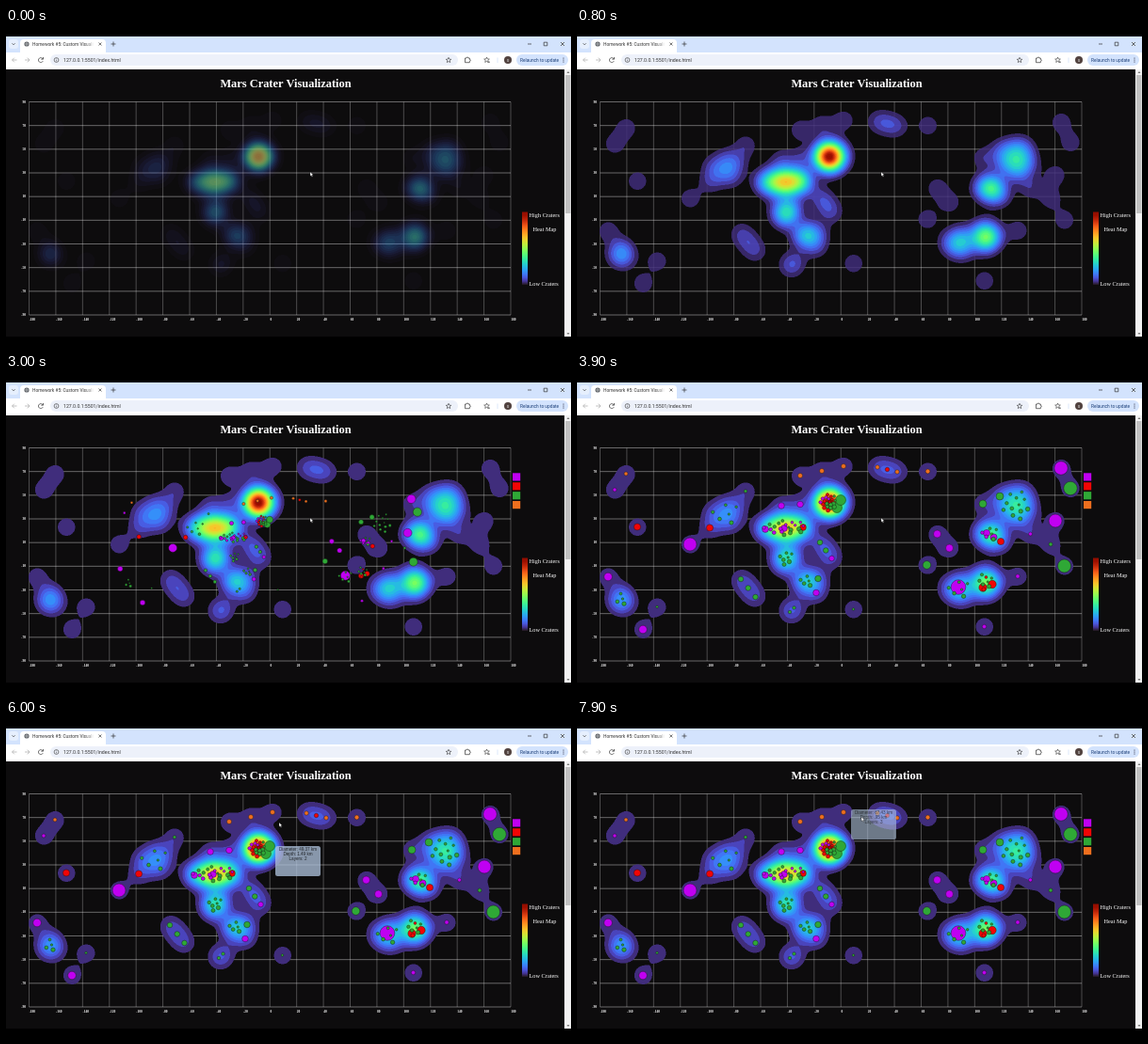
Animation, 600 px wide and 338 px high, one loop 8 s. Source, as an HTML page with a canvas:

```html
<!DOCTYPE html>
<html lang="en">
<head>
<meta charset="utf-8">
<title>Mars Crater Visualization</title>
<style>
  html, body { margin: 0; width: 100%; height: 100%; overflow: hidden; background: #000; }
  canvas { display: block; }
</style>
</head>
<body>
<canvas id="stage" width="600" height="338"></canvas>
<script>
const LOOP = 8000;
const UI = 'Roboto, "Open Sans", sans-serif';
const SERIF = '"Liberation Serif", serif';
const SANS = '"Liberation Sans", sans-serif';
const COLORS = { p: '#c000f2', r: '#f20505', g: '#2fa836', o: '#ee6f1e' };
const PLOT = { x: 24.5, y: 78.5, right: 536, bottom: 305 };
const CENTER = { x: 280, y: 192 };

const ctx = document.getElementById('stage').getContext('2d');
const clamp = (v, lo = 0, hi = 1) => Math.max(lo, Math.min(hi, v));
const mix = (a, b, k) => a + (b - a) * k;
const cubicInOut = t => t < .5 ? 4 * t ** 3 : 1 - 4 * (1 - t) ** 3;
const progress = (t, start, length) => cubicInOut(clamp((t - start) / length));

// ---------- craters: each letter of `kinds` is a colour ----------
const craters = [];

// Evenly spaced along a line.
function trail(kinds, r, x1, y1, x2 = x1, y2 = y1) {
  [...kinds].forEach((kind, i) => {
    const k = i / Math.max(1, kinds.length - 1);
    craters.push({ kind, r, x: mix(x1, x2, k), y: mix(y1, y2, k) });
  });
}
// Small craters in a sunflower pattern, twice `spread` in radius.
function swarm(kinds, count, x, y, spread, stretch = 1) {
  for (let i = 0; i < count; i++) {
    const angle = i * 2.4, reach = 2 * spread * Math.sqrt((i + .5) / count);
    craters.push({
      kind: kinds[i % kinds.length],
      r: 1.2 + 1.2 * (i * .618 % 1),
      x: x + stretch * reach * Math.cos(angle),
      y: y + reach * Math.sin(angle)
    });
  }
}

trail('pg', 7.2, 514, 100, 524, 121.5);
trail('pg', 7, 508, 156, 517.5, 204);
trail('pg', 2, 481.5, 170, 503, 181);
trail('pp', 4.3, 33, 215.5, 70, 271.5);
trail('po', 2, 40, 123, 52, 106);
trail('ooo', 2.5, 237, 108, 283, 98);
trail('oro', 2.2, 319, 99, 340, 104);
trail('o', 2.4, 372.5, 103.5);
trail('rr', 3.6, 64, 162.5, 141, 163.5);
trail('gg', 1.3, 85, 247.5, 293.5, 250);
trail('pp', 2.2, 432.5, 268.5, 468, 215);
trail('pp', 3.3, 217, 140, 237, 138.5);
trail('ppr', 3.4, 200, 165, 240, 163);
trail('pp', 4, 382.5, 170, 395.5, 185);
trail('ppr', 3.6, 435, 169, 450, 178);
trail('rr', 4.2, 431, 227, 441, 223.5);
trail('gg', 4, 431, 138, 449, 130);
trail('gg', 5.5, 276, 142, 280, 134);
trail('ggg', 2.8, 174, 218, 189.5, 237);
trail('gg', 1.8, 226, 253, 230.5, 248.5);
trail('ggp', 2.8, 258, 179, 270.5, 196);
trail('gp', 3.3, 256, 217.5, 254, 232.5);
trail('g', 4.3, 371.5, 203);
trail('g', 1.7, 179, 124.5);
trail('p', 7, 120, 181);
trail('p', 7.8, 405, 226.5);

swarm('rgpgr', 20, 267, 136, 4.5);
swarm('gppg', 20, 221, 163, 4, 3);
swarm('g', 7, 222, 195, 4);
swarm('g', 5, 244, 220, 3.5);
swarm('ggrg', 8, 434, 221, 4.5);
swarm('gpg', 6, 438, 170, 4.5);
swarm('g', 12, 466, 139, 8);
swarm('g', 6, 405, 229, 6);
swarm('g', 6, 157, 149, 7.5);
swarm('g', 4, 46, 239, 3.5);
craters.sort((a, b) => b.r - a.r);

// ---------- heat map: stacked density contours ----------
const HEAT = { x: 18, y: 68, w: 524, h: 244, scale: 2, sigma: 9, step: .593 };
const heatCanvas = document.createElement('canvas');
heatCanvas.width = HEAT.w * HEAT.scale;
heatCanvas.height = HEAT.h * HEAT.scale;
const heatCtx = heatCanvas.getContext('2d');
const heatImage = heatCtx.createImageData(heatCanvas.width, heatCanvas.height);

function densityLevels() {
  const { width: w, height: h } = heatCanvas, s = HEAT.scale, reach = 32 * s;
  const density = new Float32Array(w * h);
  for (const c of craters) {
    const cx = (c.x - HEAT.x) * s, cy = (c.y - HEAT.y) * s;
    for (let y = Math.max(0, Math.ceil(cy - reach)); y < Math.min(h, cy + reach); y++)
      for (let x = Math.max(0, Math.ceil(cx - reach)); x < Math.min(w, cx + reach); x++)
        density[y * w + x] += Math.exp(-((x - cx) ** 2 + (y - cy) ** 2) / (2 * (HEAT.sigma * s) ** 2));
  }
  return Uint8Array.from(density, d => Math.floor(d / HEAT.step));
}
const levels = densityLevels();
const topLevel = levels.reduce((a, b) => Math.max(a, b), 0);

// Polynomial approximation of the Turbo colour map.
function turbo(t) {
  return [
    34.61 + t * (1172.33 - t * (10793.56 - t * (33300.12 - t * (38394.49 - t * 14825.05)))),
    23.31 + t * (557.33 + t * (1225.33 - t * (3574.96 - t * (1073.77 + t * 707.56)))),
    27.2 + t * (3211.1 - t * (15327.97 - t * (27814 - t * (22569.18 - t * 6838.66))))
  ].map(v => clamp(Math.round(v), 0, 255));
}

let paintedOpacity = -1;
function paintHeat(opacity) {
  if (opacity === paintedOpacity) return;
  paintedOpacity = opacity;
  const palette = [[0, 0, 0, 0]];
  let sum = [0, 0, 0], cover = 0;
  for (let i = 1; i <= topLevel; i++) {
    const color = turbo(i / topLevel);
    sum = sum.map((v, k) => mix(v, color[k], opacity));
    cover = mix(cover, 1, opacity);
    palette.push([...sum.map(v => v / (cover || 1)), cover * 255]);
  }
  levels.forEach((level, i) => heatImage.data.set(palette[level], i * 4));
  heatCtx.putImageData(heatImage, 0, 0);
}

// ---------- drawing helpers ----------
function rect(x, y, w, h, fill, radius = 0) {
  ctx.fillStyle = fill;
  ctx.beginPath();
  ctx.roundRect(x, y, w, h, radius);
  ctx.fill();
}
function disc(x, y, r, fill, stroke, lineWidth = .6) {
  ctx.beginPath();
  ctx.arc(x, y, r, 0, 2 * Math.PI);
  if (fill) { ctx.fillStyle = fill; ctx.fill(); }
  if (stroke) { ctx.strokeStyle = stroke; ctx.lineWidth = lineWidth; ctx.stroke(); }
}
function path(d, stroke, lineWidth = .7, fill) {
  const shape = new Path2D(d);
  if (fill) { ctx.fillStyle = fill; ctx.fill(shape); }
  if (stroke) { ctx.strokeStyle = stroke; ctx.lineWidth = lineWidth; ctx.stroke(shape); }
}
function text(str, x, y, font, fill, align = 'left') {
  ctx.font = font;
  ctx.fillStyle = fill;
  ctx.textAlign = align;
  ctx.fillText(str, x, y);
}
function star(x, y, r) {
  let d = '';
  for (let i = 0; i < 10; i++) {
    const a = i * Math.PI / 5 - Math.PI / 2, k = i % 2 ? r * .45 : r;
    d += `${i ? 'L' : 'M'}${x + k * Math.cos(a)} ${y + k * Math.sin(a)}`;
  }
  path(d + 'Z', '#333', .6);
}

// ---------- scene parts ----------
function drawBrowser() {
  const ink = '#333', pale = '#aaa';
  rect(0, 9, 600, 18, '#d3e3fd');
  rect(3, 12, 10, 10, '#e6effd', 3);
  path('M6.5 16.3L8 17.8L9.5 16.3', ink);
  rect(15, 12, 91, 16, '#fff', [4, 4, 0, 0]);
  disc(22, 17, 2.6, '#5f6368');
  path('M19.6 17H24.4M22 14.6V19.4', '#fff', .4);
  text('Homework #5: Custom Visuali', 28, 18.8, `4.8px ${UI}`, '#333');
  const fade = ctx.createLinearGradient(84, 0, 94, 0);
  fade.addColorStop(0, '#fff0');
  fade.addColorStop(1, '#fff');
  rect(84, 13, 11, 9, fade);
  path('M98.4 15.5L101.4 18.5M101.4 15.5L98.4 18.5M111.5 17H116.5M114 14.5V19.5', ink);
  path('M554 17H558M571.2 15.2h3.6v3.6h-3.6ZM589 15L593 19M593 15L589 19', ink);

  rect(0, 26, 600, 18, '#fff');
  path('M11.5 34H6.5M8.8 31.7L6.5 34L8.8 36.3M20 34H25M22.7 31.7L25 34L22.7 36.3', pale);
  path('M39.2 33A2.5 2.5 0 1 0 39.2 35.2M39.5 31V33.2H37.3', ink);
  rect(47, 28, 433, 12, '#edf1fa', 6);
  disc(53.5, 34, 2.4, null, ink);
  path('M53.5 33.6V35.4M53.5 32.4V32.9', ink, .5);
  text('127.0.0.1:5501/index.html', 61, 35.8, `5.2px ${UI}`, '#333');
  star(470, 34.2, 2.9);
  path('M487.5 32H489a1 1 0 0 1 2 0H492.3V33.3a1 1 0 0 1 0 2V36.7H487.5Z', ink);
  star(510.5, 34, 3);
  path('M511.5 36.2H514', ink);
  path('M522 31.5V37', '#c7d8f6', .6);
  disc(533, 34, 4, '#51423f');
  text('S', 533, 35.5, `4px ${UI}`, '#eee', 'center');
  rect(542, 28, 55, 12, '#d3e3fd', 6);
  text('Relaunch to update', 546, 35.7, `4.8px ${UI}`, '#1c3f78');
  for (const y of [32, 34, 36]) disc(592, y, .55, '#223');

  rect(0, 44, 593, 284, '#0d0c0d');
  rect(593, 44, 7, 284, '#f3f3f3');
  rect(594, 50, 5.5, 147, '#c1c1c1');
  path('M595.5 48L597 46L598.5 48ZM595.5 324L597 326L598.5 324Z', null, 0, '#777');
}

function drawAxes() {
  text('Mars Crater Visualization', 297, 63.4, `bold 12.4px ${SERIF}`, '#fff', 'center');
  const font = `bold 3.5px ${SERIF}`;
  for (let i = 0; i <= 18; i++) {
    const x = mix(PLOT.x, PLOT.right, i / 18);
    path(`M${x} ${PLOT.y}V${PLOT.bottom}`, 'rgba(255,255,255,.38)', .7);
    text(String(i * 20 - 180), x + .2, 311, font, '#fff');
  }
  for (let i = 0; i <= 9; i++) {
    const y = mix(PLOT.y, PLOT.bottom, i / 9);
    path(`M${PLOT.x} ${y}H${PLOT.right}`, 'rgba(255,255,255,.55)', .7);
    text(String(90 - i * 20), 21, y + 1, font, '#fff', 'right');
  }
}

function drawHeatLegend() {
  const ramp = ctx.createLinearGradient(0, 273, 0, 195.5);
  for (let i = 0; i <= 20; i++) ramp.addColorStop(i / 20, `rgb(${turbo(i / 20)})`);
  rect(548, 195.5, 6, 77.5, ramp);
  const font = `6.3px ${SERIF}`;
  text('High Craters', 555.5, 201, font, '#fff');
  text('Heat Map', 559.5, 215.5, font, '#fff');
  text('Low Craters', 555.5, 274, font, '#fff');
}

function drawCraters(t) {
  const start = 1894;
  if (t < start) return;
  Object.values(COLORS).forEach((color, i) => rect(538, 105.3 + i * 9.9, 8.2, 8.2, color));
  const k = progress(t, start, 2000);
  for (const c of craters)
    disc(mix(CENTER.x, c.x, k), mix(CENTER.y, c.y, k), k * c.r, COLORS[c.kind], '#111', .4);
}

const tips = [
  { x: 286, y: 134, show: 5400, hide: 5830, lines: ['Diameter: 49.37 km', 'Depth: 1.49 km', 'Layers: 2'] },
  { x: 291, y: 95, show: 7350, hide: 7680, lines: ['Diameter: 67.43 km', 'Depth: .95 km', 'Layers: 3'] }
];
function drawTips(t) {
  for (const tip of tips) {
    ctx.globalAlpha = .9 * progress(t, tip.show, 200) * (1 - progress(t, tip.hide, 500));
    if (!ctx.globalAlpha) continue;
    rect(tip.x, tip.y, 48, 32, 'lightsteelblue', 2.5);
    tip.lines.forEach((line, i) => text(line, tip.x + 24, tip.y + 4.7 + i * 5.3, `4.6px ${SANS}`, '#000', 'center'));
  }
  ctx.globalAlpha = 1;
}

const cursorStops = [
  { at: 4500, x: 323, y: 153 }, { at: 5500, x: 284, y: 138 }, { at: 6000, x: 290, y: 109 },
  { at: 7400, x: 285, y: 101 }, { at: 7900, x: 302, y: 103 }
];
function drawCursor(t) {
  let { x, y } = cursorStops[0];
  for (let i = 1; i < cursorStops.length; i++) {
    const from = cursorStops[i - 1], to = cursorStops[i];
    const k = progress(t, from.at, to.at - from.at);
    x = mix(x, to.x, k);
    y = mix(y, to.y, k);
  }
  ctx.save();
  ctx.translate(x, y);
  path('M0 0V4.6L1.1 3.6L1.9 5.3L2.7 4.9L1.9 3.3H3.4Z', '#000', .3, '#fff');
  ctx.restore();
}

function draw(t) {
  rect(0, 0, 600, 338, '#000');
  drawBrowser();
  drawAxes();
  paintHeat(progress(t, -494, 2000));
  ctx.drawImage(heatCanvas, HEAT.x, HEAT.y, HEAT.w, HEAT.h);
  drawHeatLegend();
  drawCraters(t);
  drawTips(t);
  drawCursor(t);
}

let origin;
function tick(now) {
  origin ??= now;
  draw((now - origin) % LOOP);
  requestAnimationFrame(tick);
}
requestAnimationFrame(tick);
</script>
</body>
</html>
```
